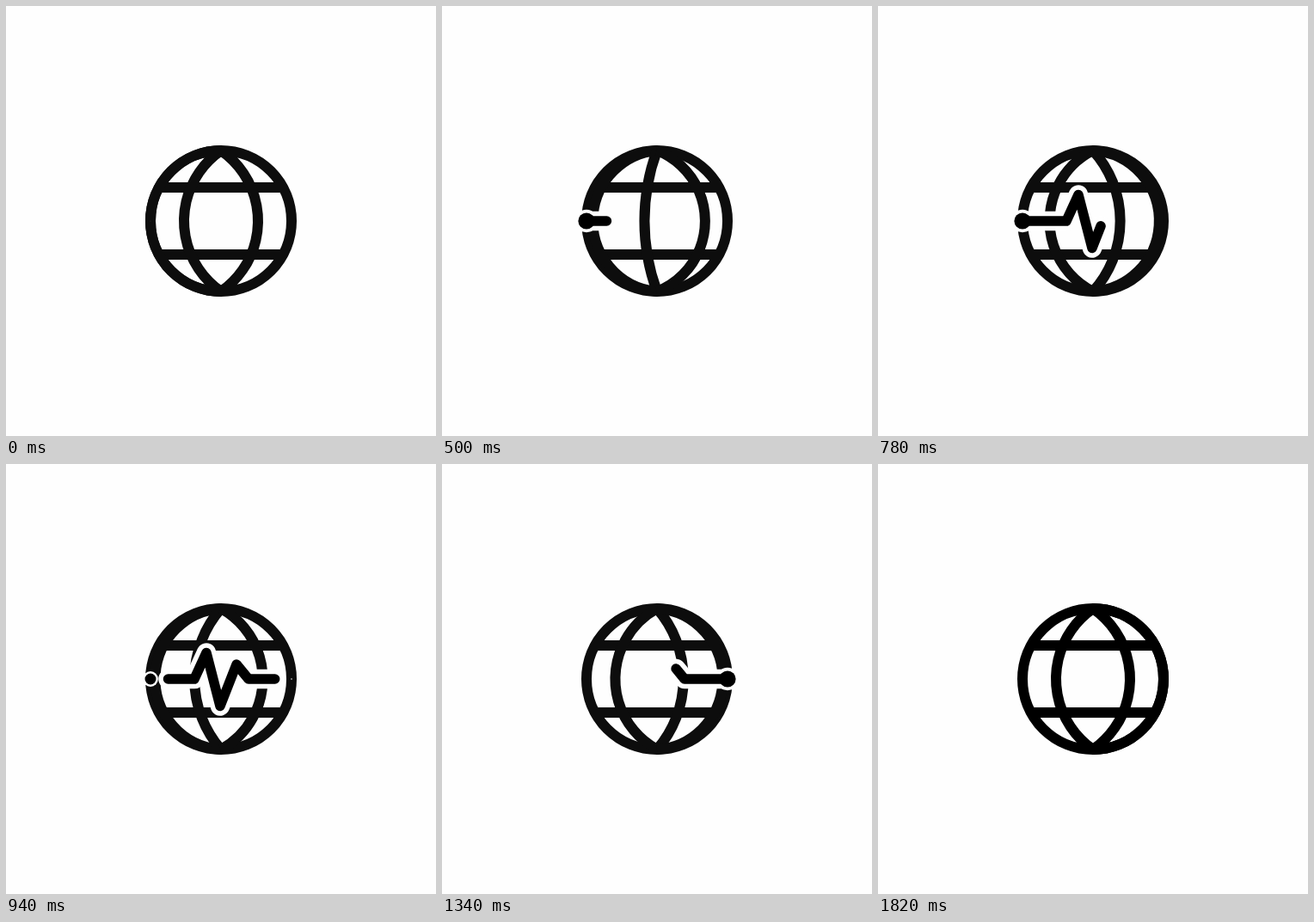
These frames come from a looping animation (500 by 500 pixels, 1.84 s). An HTML page with a canvas:

```html
<!DOCTYPE html>
<html lang="en">
<head>
<meta charset="utf-8">
<title>Globe pulse</title>
<style>
  html, body { margin: 0; width: 100%; height: 100%; overflow: hidden; background: #fefefe; }
  canvas { display: block; }
</style>
</head>
<body>
<canvas id="stage" width="500" height="500"></canvas>
<script>
const ctx = document.getElementById('stage').getContext('2d');
const LOOP = 1840, C = 250, R = 82, REST = 43, DOT = 9.6, PAPER = '#fefefe';
const PULSE = [[168, 250], [219, 250], [233, 219.5], [249, 281.5], [268, 233], [282, 250], [332, 250]];
const LENGTH = PULSE.slice(1).reduce(
  (sum, [x, y], i) => sum + Math.hypot(x - PULSE[i][0], y - PULSE[i][1]), 0);

const span = (t, from, to) => Math.min(1, Math.max(0, (t - from) / (to - from)));
const smooth = u => u * u * (3 - 2 * u);
const cubicOut = u => 1 - (1 - u) ** 3;
const cubicInOut = u => u < .5 ? 4 * u ** 3 : 1 - 4 * (1 - u) ** 3;
const backOut = u => 1 + 2.7 * (u - 1) ** 3 + 1.7 * (u - 1) ** 2;

// Arc from pole to pole, bulging sideways by the given amount.
function meridian(bulge) {
  const s = Math.max(.1, Math.abs(bulge)), side = Math.sign(bulge) || 1;
  const r = (R * R + s * s) / (2 * s), a = 2 * Math.atan(s / R);
  const mid = side > 0 ? 0 : Math.PI;
  ctx.beginPath();
  ctx.arc(C + side * (s - r), C, r, mid - a, mid + a);
  ctx.stroke();
}

function globe(t) {
  const turns = cubicInOut(span(t, 0, 1150)) + cubicOut(span(t, 885, LOOP));
  const q = turns % 1, enter = turns < 1 ? q ** 1.5 : q;
  ctx.strokeStyle = t < 1700 ? '#0d0d0d' : '#000';
  ctx.lineWidth = 12;
  ctx.beginPath();
  ctx.arc(C, C, R, 0, 7);
  ctx.stroke();
  for (const y of [211, 289]) {
    ctx.beginPath();
    ctx.moveTo(178, y);
    ctx.lineTo(322, y);
    ctx.stroke();
  }
  meridian(-R + (R - REST) * enter);
  meridian(-REST + 2 * REST * q);
  meridian(REST + (R - REST) * q);
}

// Radius of a dot that pops up with a small overshoot and shrinks away.
const pop = (t, from, to, rise) =>
  DOT * backOut(span(t, from, from + rise)) * (1 - smooth(span(t, to - 200, to)));

function dot(x, r, color) {
  ctx.fillStyle = color;
  ctx.beginPath();
  ctx.arc(x, C, Math.max(0, r), 0, 7);
  ctx.fill();
}

function line(tail, head, width, color) {
  if (head - tail < .003) return;
  ctx.save();
  ctx.lineCap = ctx.lineJoin = 'round';
  ctx.lineWidth = width;
  ctx.strokeStyle = color;
  ctx.setLineDash([(head - tail) * LENGTH, 2 * LENGTH]);
  ctx.lineDashOffset = -tail * LENGTH;
  ctx.beginPath();
  PULSE.forEach(([x, y]) => ctx.lineTo(x, y));
  ctx.stroke();
  ctx.restore();
}

function draw(t) {
  ctx.fillStyle = PAPER;
  ctx.fillRect(0, 0, 500, 500);
  globe(t);
  const head = smooth(span(t, 380, 1050)), tail = smooth(span(t, 810, 1590));
  const left = pop(t, 0, 1065, 320), right = pop(t, 935, 1690, 400);
  const layer = (width, scale, color) => {
    line(tail, head, width, color);
    dot(168, left * scale, color);
    dot(332, right * scale, color);
  };
  layer(22.5, 1.37, PAPER);
  layer(11.5, 1, '#000');
}

const start = performance.now();
function tick() {
  draw((performance.now() - start) % LOOP);
  requestAnimationFrame(tick);
}
tick();
</script>
</body>
</html>
```
